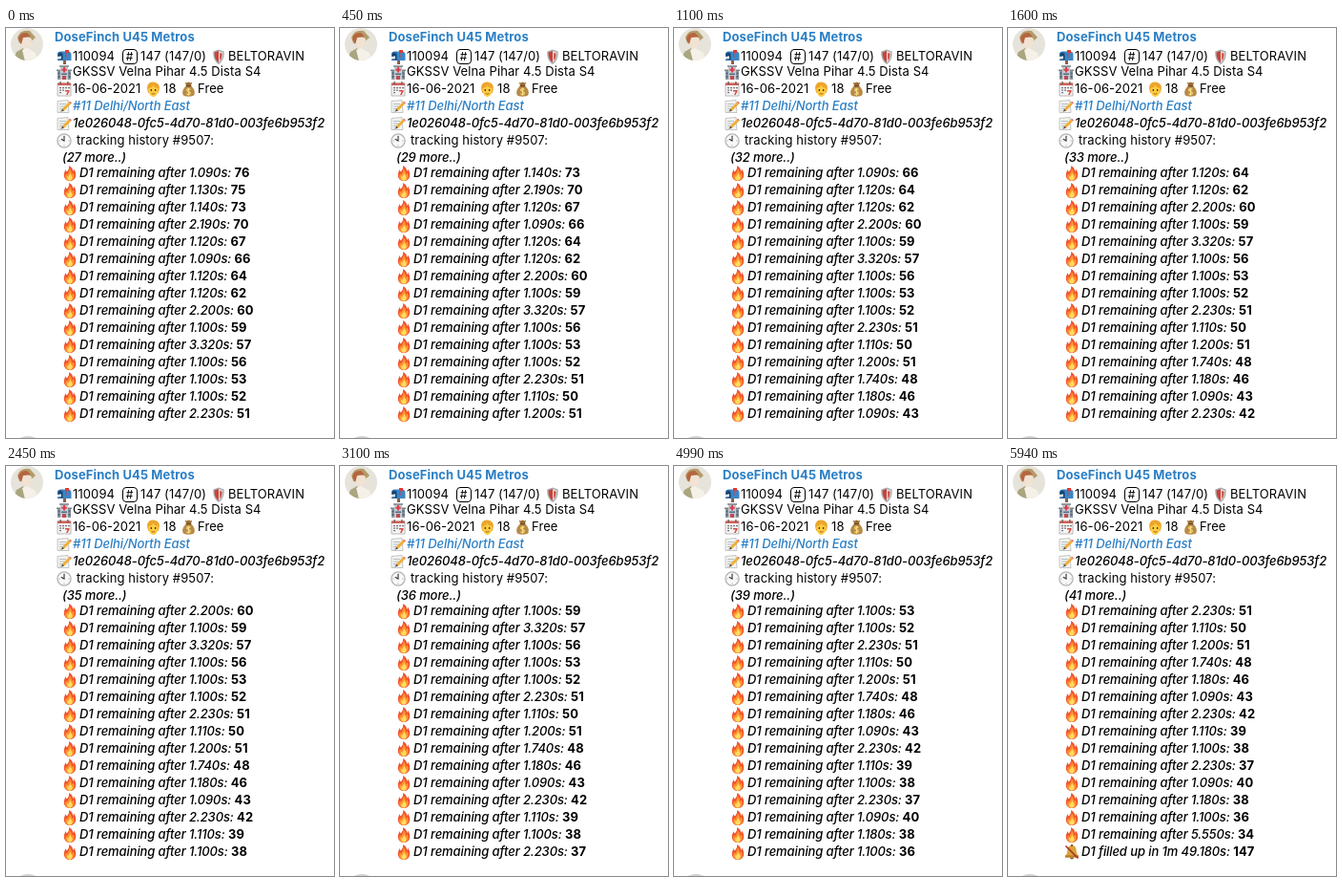
These frames come from a looping animation (344x429 px, 8 s). An HTML page with a canvas:

```html
<!DOCTYPE html>
<html lang="en">
<head>
<meta charset="utf-8">
<title>Tracking history</title>
<style>
html, body { margin: 0; width: 100%; height: 100%; overflow: hidden; background: #fff; }
canvas { display: block; width: 344px; height: 429px; }
</style>
</head>
<body>
<canvas id="stage"></canvas>
<script>
const W = 344, H = 429, LOOP = 8000, ROWS = 15, FIRST = 27;
const FONT = 'Inter, "Liberation Sans", sans-serif';
const BLUE = '#2a7fc5', BLACK = '#000';

// letter spacing per type style
const PLAIN = { face: '400', spacing: '0.1px' };
const ITALIC = { face: 'italic 500', spacing: '-0.1px' };
const BOLD = { face: '700', spacing: '0.1px' };

const canvas = document.getElementById('stage');
const ctx = canvas.getContext('2d');
const dpr = window.devicePixelRatio || 1;
canvas.width = W * dpr;
canvas.height = H * dpr;

// seconds and doses left, oldest first
const log = `1.090 76,1.130 75,1.140 73,2.190 70,1.120 67,1.090 66,1.120 64,1.120 62,2.200 60,1.100 59,
3.320 57,1.100 56,1.100 53,1.100 52,2.230 51,1.110 50,1.200 51,1.740 48,1.180 46,1.090 43,2.230 42,
1.110 39,1.100 38,2.230 37,1.090 40,1.180 38,1.100 36,5.550 34`
  .split(',').map(s => s.trim().split(' '));

// moments at which one more entry arrives
const arrivals = [100, 450, 700, 950, 1100, 1600, 2000, 2450, 3100, 3250, 3500, 3850, 5590, 5940];

// icons are lists of [fill, path, stroke, line width] on a 16 px square
const icons = {
  mailbox: [
    ['#8a5f4c', 'M7 10h3v6H7z'],
    ['#3d86c6', 'M1 6a3.5 3.5 0 0 1 3.5-3.5H12a3.5 3.5 0 0 1 3.5 3.5v6H1z'],
    ['#2a659f', 'M1 6a3 3 0 0 1 6 0v6H1z'],
    ['#173d66', 'M2 6.2a2 2 0 0 1 4 0V11H2z'],
    ['#dfe8ef', 'M1 8l4-.8v3l-4 .6z'],
    ['#df3b35', 'M9 1h4v3h-2.7v5H9z']
  ],
  hospital: [
    ['#8f969c', 'M1 6h14v10H1z'],
    ['#c5cbd0', 'M4 2h8v14H4z'],
    ['#7a8289', 'M3 1.2h10v1.6H3zM0 5.5h4v1.4H0zM12 5.5h4v1.4h-4z'],
    ['#df3d4b', 'M7 3h2v1.7h1.7v2H9v1.7H7V6.7H5.3v-2H7z'],
    ['#4a6d87', 'M1.5 8.5h2v2h-2zM12.5 8.5h2v2h-2zM1.5 12h2v2h-2zM12.5 12h2v2h-2zM5 9.5h6v1.6H5z'],
    ['#be4b55', 'M6 12h4v4H6z']
  ],
  calendar: [
    ['#f4f4f4', 'M1 2h14v13H1z', '#a9a9a9', .8],
    ['#d0625a', 'M1 1.5h14V4H1z'],
    ['#777', 'M3 6h2v1.3H3zM6 6h2v1.3H6zM9 6h2v1.3H9zM12 6h2v1.3h-2zM3 8.5h2v1.3H3zM6 8.5h2v1.3H6zM3 11h2v1.3H3z'],
    ['#d94b43', 'M9 9h4.5v1.5L11.5 14H10l1.7-3.5H9z'],
    ['#555', 'M3.5 0h1.2v3H3.5zM11.3 0h1.2v3h-1.2z']
  ],
  face: [
    ['#eda52c', 'M1.5 9C0 3 4 0 8 .5S16 3 14.5 9l-1 3h-11z'],
    ['#fccb3f', 'M2.5 7C5 7 7 5.5 8 4c1.5 2 3.5 3 5.5 3 0 5-2 9-5.5 9S2.5 12 2.5 7z'],
    ['#56381c', 'M5 8h1.4v2H5zM9.6 8H11v2H9.6z'],
    [null, 'M6 12.5q2 1.3 4 0', '#9b5220', .9]
  ],
  bag: [
    ['#b88a48', 'M5.5 4.5C2 7 .5 10 1.5 13.500c.5 3 12.5 3 13 0C15.5 10 14 7 10.5 4.5z'],
    ['#9b6b30', 'M4 .8l2 .7 2-1 2 1 2-.7-1.5 3.7h-5z'],
    ['#6f4920', 'M5 4h6v1.3H5z'],
    [null, 'M10 8.5C8.5 7 6 7.5 6 9s4 1.3 4 3-2.5 2-4.2.7M8 6.8v8', '#f6dc7c', 1.2]
  ],
  memo: [
    ['#f3f3ee', 'M1 2.5L12 1.5l1 13H1z', '#b6b9bb', .8],
    [null, 'M3 5.5h7M3 8h6M3 10.5h4M3 13h3', '#a3b4bf', .8],
    ['#f1ae35', 'M13 3.5l2 2-7 7-2-2z'],
    ['#e2736f', 'M13 3.5l1-1 2 2-1 1z'],
    ['#594331', 'M6 10.5l2 2-3 1z']
  ],
  clock: [
    ['#f8f8f8', 'M8 .9a7.1 7.1 0 1 1 0 14.2A7.1 7.1 0 0 1 8 .9z', '#b2b5b8', 1.3],
    [null, 'M8 2.5v1M8 12.5v1M2.5 8h1M12.5 8h1', '#777', .7],
    [null, 'M8 3v5L4.8 6.2', '#333', 1.1]
  ],
  shield: [
    ['#a9aeb2', 'M8 .5L14.5 2.5C15 9 12.5 13.5 8 16 3.5 13.5 1 9 1.5 2.5z'],
    ['#e0dcda', 'M8 2L13 3.5C13.3 8.5 11.5 12 8 14.3z'],
    ['#c9433a', 'M8 2L3 3.5C2.7 8.5 4.5 12 8 14.3z'],
    ['#c9433a', 'M9.500 4L12 4.700C12 8.500 11 11 9.500 12z']
  ],
  flame: [
    ['#f0532d', 'M7 0c4 2 4.5 4 4.6 6 .7-.6 1-1.5 1-2.5C15 6 15.5 8.5 15 11c-.7 3.5-3.5 5-7 5s-6.5-2-7-5C.5 8 2 6 3 4c.3 1.5.7 2 1.5 2.5C6 4.5 7.5 3 7 0z'],
    ['#ff922e', 'M7.5 3c3 2.5 2.5 4.5 3 6 1-.5 1.5-1 1.7-2 1.8 3 2 8-4 8.5C2 16 1.5 11.5 3.5 8c.3 1 .7 1.5 1.3 2C5.5 7 8 6 7.5 3z'],
    ['#ffdb62', 'M8.3 7.5c.5 2.5 2.7 3 2.7 5.3 0 2-1.4 2.9-3 2.9s-3.2-1-3.2-3c0-1 .4-1.7.8-2.2.3.7.6 1 1.1 1.3.1-2 1.3-2.5 1.6-4.3z']
  ],
  mutedBell: [
    ['#dba23a', 'M8 1c3.5 0 4.5 2.5 4.7 5.5.2 3 .8 4 2.3 5.5v1.5H1V12c1.5-1.5 2-2.5 2.3-5.5C3.5 3.5 4.5 1 8 1z'],
    ['#8a5c22', 'M6 13.5h4a2 2 0 0 1-4 0zM7 0h2v2H7z'],
    ['#b87b28', 'M1 11.5h14v2H1z'],
    [null, 'M1.5 1.5l13 13', '#a62f2b', 1.6]
  ]
};
for (const parts of Object.values(icons)) {
  for (const part of parts) part[1] = new Path2D(part[1]);
}

function icon(name, x, y, w = 16, h = w) {
  ctx.save();
  ctx.translate(x, y);
  ctx.scale(w / 16, h / 16);
  for (const [fill, path, stroke, width] of icons[name]) {
    if (fill) { ctx.fillStyle = fill; ctx.fill(path); }
    if (stroke) { ctx.strokeStyle = stroke; ctx.lineWidth = width; ctx.stroke(path); }
  }
  ctx.restore();
}

// returns the x position after the text
function text(str, x, y, style = PLAIN, color = BLACK, size = 13) {
  ctx.font = `${style.face} ${size}px ${FONT}`;
  ctx.letterSpacing = style.spacing;
  ctx.fillStyle = color;
  ctx.fillText(str, x, y);
  return x + ctx.measureText(str).width;
}

function shape(color, d) {
  ctx.fillStyle = color;
  ctx.fill(new Path2D(d));
}

function disc(color, x, y, r) {
  ctx.fillStyle = color;
  ctx.beginPath();
  ctx.arc(x, y, r, 0, 7);
  ctx.fill();
}

function avatar() {
  ctx.save();
  ctx.beginPath();
  ctx.arc(22, 17, 17, 0, 7);
  ctx.clip();
  ctx.fillStyle = '#e6e3da';
  ctx.fillRect(4, 0, 36, 35);
  shape('#b39c6c', 'M12 10Q15 1 25 3l6 7-6 5-11 1z');
  shape('#f1e2d2', 'M17 10q8-2 10 2l-1 7-6 3-4-5z');
  shape('#b5653f', 'M13 12q1-8 9-7l4 4-8 1-2 7z');
  shape('#a9a57f', 'M7 34l4-9 7-4 4 13z');
  shape('#f5f1e8', 'M17 23l5-2 9 5 2 9H20z');
  ctx.restore();
}

function header() {
  avatar();
  disc('#d2d2d2', 23, 444, 17);

  text('DoseFinch U45 Metros', 51, 14, BOLD, BLUE);

  icon('mailbox', 53, 22);
  text('110094', 70, 34);
  ctx.strokeStyle = BLACK;
  ctx.lineWidth = 1;
  ctx.beginPath();
  ctx.roundRect(122.5, 22.5, 15, 15, 3.5);
  ctx.stroke();
  text('#', 125.7, 34.3, PLAIN, BLACK, 12);
  text('147 (147/0)', 141, 34);
  icon('shield', 216, 22, 14, 16);
  text('BELTORAVIN', 233, 34);

  icon('hospital', 53, 38);
  text('GKSSV Velna Pihar 4.5 Dista S4', 70, 50);

  icon('calendar', 53, 56);
  text('16-06-2021', 70, 68);
  icon('face', 147, 56, 15, 16);
  text('18', 165, 68);
  icon('bag', 184, 56, 15, 16);
  text('Free', 201, 68);

  icon('memo', 53, 74);
  text('#11 Delhi/North East', 70, 86, ITALIC, BLUE);
  icon('memo', 53, 92);
  text('1e026048-0fc5-4d70-81d0-003fe6b953f2', 70, 104, ITALIC);
  icon('clock', 53, 110);
  text('tracking history #9507:', 74, 122);
}

function entry(i, y) {
  const done = i === log.length;
  icon(done ? 'mutedBell' : 'flame', done ? 59 : 60, y - 12, done ? 16 : 14, 16);
  const [secs, left] = done ? [] : log[i];
  const label = done ? 'D1 filled up in 1m 49.180s: ' : `D1 remaining after ${secs}s: `;
  text(done ? '147' : left, text(label, 77, y, ITALIC), y, BOLD);
}

function draw(t) {
  const n = arrivals.filter(a => a <= t).length;
  ctx.setTransform(dpr, 0, 0, dpr, 0, 0);
  ctx.fillStyle = '#fff';
  ctx.fillRect(0, 0, W, H);
  header();
  text(`(${FIRST + n} more..)`, 59, 140, ITALIC);
  for (let r = 0; r < ROWS; r++) entry(n + r, 156 + r * 18);
}

function tick() {
  draw(performance.now() % LOOP);
  requestAnimationFrame(tick);
}
tick();
</script>
</body>
</html>
```
